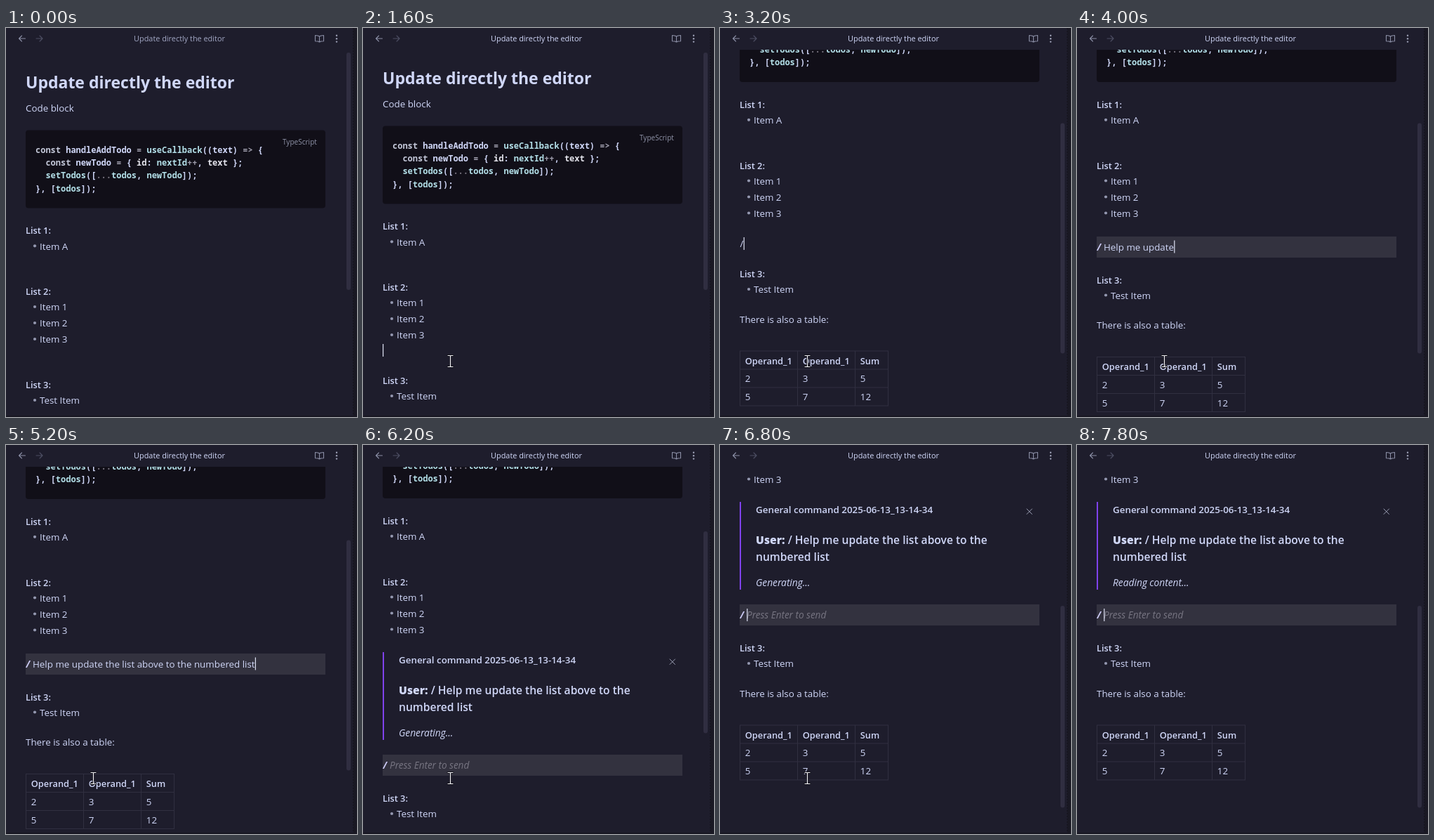
Animation of 500 by 554 pixels, one loop 8000 ms. Source, as an HTML page:

```html
<!DOCTYPE html>
<html lang="en">
<head>
<meta charset="utf-8">
<title>Update directly the editor</title>
<style>
  html, body { margin: 0; width: 100%; height: 100%; overflow: hidden; background: #1e1d2c; }
  svg { display: block; width: 100vw; height: 100vh; }
  text { font: 13.37px "Open Sans", "Noto Sans", sans-serif; fill: #d0d7f8; white-space: pre; }
  .h1 { font-size: 23px; font-weight: 700; }
  .b { font-size: 12.8px; font-weight: 600; }
  .cmd { font-size: 13.37px; font-weight: 600; }
  .user { font-size: 15.6px; font-weight: 600; }
  .user tspan { font-weight: 800; }
  .i { font-size: 13.8px; font-style: italic; }
  .hint { font-size: 13.6px; font-style: italic; fill: #777582; }
  .slash { font-weight: 700; font-style: italic; fill: #cfcdf8; }
  .lang { font-size: 10.05px; fill: #8f93a8; }
  .bar { font-size: 10.9px; text-anchor: middle; }
  .code { font: 600 12px "Noto Sans Mono", "DejaVu Sans Mono", monospace; }
  .k { fill: #c3c7d8; } .o { fill: #a09fae; } .f { fill: #b3dfe8; } .d { fill: #77737f; }
  .w { fill: #e6e6ee; }
  .line { fill: none; stroke-linecap: round; stroke-linejoin: round; }
</style>
</head>
<body>
<svg viewBox="0 0 500 554">
  <defs><clipPath id="view"><rect y="31" width="484" height="522"/></clipPath></defs>
  <rect width="500" height="554" fill="#1e1d2c"/>
  <g clip-path="url(#view)">
    <g id="page">
      <text class="h1" x="28" y="85.5">Update directly the editor</text>
      <text x="28" y="119.3">Code block</text>
      <rect x="28" y="145.5" width="427" height="111" rx="4" fill="#110f18"/>
      <text class="lang" x="394" y="166">TypeScript</text>
      <text class="code" x="42" y="177.5"><tspan class="k">const</tspan> handleAddTodo <tspan class="o">=</tspan> <tspan class="f">useCallback</tspan>((text) <tspan class="o">=&gt;</tspan> {</text>
      <text class="code" x="42" y="195.8">  <tspan class="k">const</tspan> newTodo <tspan class="o">=</tspan> { <tspan class="w">id</tspan>: <tspan class="f">nextId</tspan><tspan class="o">++</tspan>, <tspan class="w">text</tspan> };</text>
      <text class="code" x="42" y="214.1">  <tspan class="f">setTodos</tspan>([<tspan class="d">...</tspan><tspan class="f">todos</tspan>, <tspan class="f">newTodo</tspan>]);</text>
      <text class="code" x="42" y="232.5">}, [<tspan class="f">todos</tspan>]);</text>
      <g id="lists"></g>
      <g id="block">
        <rect x="28" y="475.5" width="2" height="125" fill="#7f42ec"/>
        <text class="cmd" x="51" y="491.8">General command 2025-06-13_13-14-34</text>
        <path class="line" d="M437 485.5l7.5 7.5m0-7.5l-7.5 7.5" stroke="#9a9db3"/>
        <text class="user" x="51" y="535.7"><tspan>User:</tspan> / Help me update the list above to the</text>
        <text class="user" x="51" y="559.7">numbered list</text>
        <text class="i" id="status" x="51" y="595.5"></text>
      </g>
      <g id="row">
        <rect id="fill" x="28" y="476.5" width="427" height="30" fill="#33323f"/>
        <text id="slash" x="28.5" y="496.3">/</text>
        <text id="prompt" x="38" y="496.3"></text>
      </g>
      <g id="tail"></g>
      <rect id="caret" width="1.2" height="18" fill="#dfe3f5"/>
    </g>
  </g>
  <rect id="thumb" x="485" width="6" rx="3" fill="#302e41"/>
  <rect x="495" width="5" height="554" fill="#191823"/>
  <path d="M494.5 0V554" stroke="#14131c" stroke-dasharray="2 2"/>
  <rect y="552" width="500" height="2" fill="#181722"/>
  <text class="bar" id="bar" x="247" y="19.3">Update directly the editor</text>
  <g class="line" stroke="#8b8fa6" stroke-width="1.1">
    <path d="M27.5 15H18.5m4-4l-4 4l4 4"/>
    <path d="M43 15h9m-4-4l4 4l-4 4" stroke="#4d4e63"/>
    <path d="M446.5 12.2Q445 10.5 440.5 10.5V18.7Q445 18.7 446.5 20Q448 18.7 452.5 18.7V10.5Q448 10.5 446.5 12.2V20"/>
  </g>
  <g fill="#9a9db3">
    <circle cx="471" cy="10.8" r="1.2"/><circle cx="471" cy="15.2" r="1.2"/><circle cx="471" cy="19.6" r="1.2"/>
  </g>
  <g id="mouse" class="line">
    <path d="M-3.5-8H-1Q0-8 0-7Q0-8 1-8H3.5M0-7V7M-3.5 8H-1Q0 8 0 7Q0 8 1 8H3.5" stroke="#111019" stroke-width="2.8"/>
    <path d="M-3.5-8H-1Q0-8 0-7Q0-8 1-8H3.5M0-7V7M-3.5 8H-1Q0 8 0 7Q0 8 1 8H3.5" stroke="#f4f4f8" stroke-width="1.2"/>
  </g>
</svg>
<script>
const LOOP = 8000;
const CLICK = 1200, FOCUS = 1400, NEWLINE = 2600, SLASH = 3000, COMMAND = 3500;
const TYPE = 3700, TYPED = 4800, SEND = 5400, FOLLOW = 6350, READ = 7600;
const PROMPT = 'Help me update the list above to the numbered list';
const $ = id => document.getElementById(id);

const text = (x, y, str, cls = '') => `<text class="${cls}" x="${x}" y="${y}">${str}</text>`;
const item = (y, str) => `<circle cx="41" cy="${y - 5.3}" r="2.1" fill="#9498b0"/>` + text(48, y, str);
const list = (y, name, items) =>
  text(28, y, name, 'b') + items.map((s, i) => item(y + 22.3 + i * 23, s)).join('');

function table(top, rows) {
  const cols = [28.5, 110.5, 192.5, 239.5];
  let d = cols.map(x => `M${x} ${top}v78`).join('');
  for (let i = 0; i < 4; i++) d += `M28 ${top + i * 26}h212`;
  const cells = rows.map((row, r) => row.map((s, c) =>
    text(cols[c] + 7.3, top + 18.6 + r * 25.7, s, r ? '' : 'b')).join('')).join('');
  return `<path d="${d}" fill="none" stroke="#302f40"/>` + cells;
}

$('lists').innerHTML = list(293.3, 'List 1:', ['Item A']) +
  list(380, 'List 2:', ['Item 1', 'Item 2', 'Item 3']);
$('tail').innerHTML = list(513, 'List 3:', ['Test Item']) +
  text(28, 577.6, 'There is also a table:') +
  table(618, [['Operand_1', 'Operand_1', 'Sum'], [2, 3, 5], [5, 7, 12]]);

const move = (el, x, y) => el.setAttribute('transform', `translate(${x} ${y})`);
const show = (el, on) => el.setAttribute('visibility', on ? 'visible' : 'hidden');
const mix = (a, b, k) => a + (b - a) * k;
function ease(t, from, to) {
  const k = Math.min(1, Math.max(0, (t - from) / (to - from)));
  return k * k * (3 - 2 * k);
}

function drawCaret(t, typed) {
  let x = 28, y = 456, start = CLICK;
  if (t >= NEWLINE) { y = 477.5; start = NEWLINE; }
  if (t >= SLASH) { x = 33.6; start = SLASH; }
  if (t >= COMMAND) { x = 38.2; y = 482; start = COMMAND; }
  if (t >= TYPE) {
    x = 38.2 + (typed ? $('prompt').getComputedTextLength() : 0);
    start = Math.min(t, TYPED);
  }
  if (t >= SEND) { x = 38.2; y = 627.5; start = SEND; }
  $('caret').setAttribute('x', x);
  $('caret').setAttribute('y', y);
  show($('caret'), t >= CLICK && (t - start) % 1200 < 600);
}

function drawRow(t) {
  const active = t >= COMMAND, sent = t >= SEND;
  const typed = t < TYPE || sent ? 0
    : Math.min(PROMPT.length, Math.ceil((t - TYPE) / (TYPED - TYPE) * PROMPT.length));
  show($('row'), t >= SLASH);
  show($('fill'), active);
  $('slash').setAttribute('class', active ? 'slash' : '');
  move($('row'), 0, sent ? 145 : 0);
  $('slash').setAttribute('y', active ? 496.3 : 491.3);
  $('prompt').setAttribute('class', typed ? '' : 'hint');
  $('prompt').textContent = !active ? '' : typed ? PROMPT.slice(0, typed) : 'Press Enter to send';
  return typed;
}

function draw(t) {
  const down = ease(t, 2650, 3000), follow = ease(t, FOLLOW, 6700);
  const sent = t >= SEND;

  let scroll = t < FOCUS ? 0 : mix(6, 179.5, down);
  if (sent) scroll = mix(180.5, 394.5, follow);
  move($('page'), 0, -scroll);
  move($('tail'), 0, sent ? 175.5 : t >= COMMAND ? 30 : t >= NEWLINE ? 21.5 : 0);

  const top = sent ? mix(123, 229, follow) : mix(35, 135.5, down);
  $('thumb').setAttribute('y', top);
  $('thumb').setAttribute('height', sent ? 287.5 : t >= NEWLINE ? 328 : 338);

  show($('block'), sent);
  $('status').textContent = t < READ ? 'Generating...' : 'Reading content...';
  $('bar').style.fill = t < 1000 ? '#a2a7c4' : '#d0d7f8';
  drawCaret(t, drawRow(t));

  const enter = ease(t, 100, 900), leave = ease(t, 7300, 7780);
  move($('mouse'), mix(mix(350, 124.5, enter), 512, leave), mix(mix(350, 474.5, enter), 300, leave));
  show($('mouse'), t >= 150 && leave < 1);
}

const begin = performance.now();
function tick() {
  draw((performance.now() - begin) % LOOP);
  requestAnimationFrame(tick);
}
tick();
</script>
</body>
</html>
```
